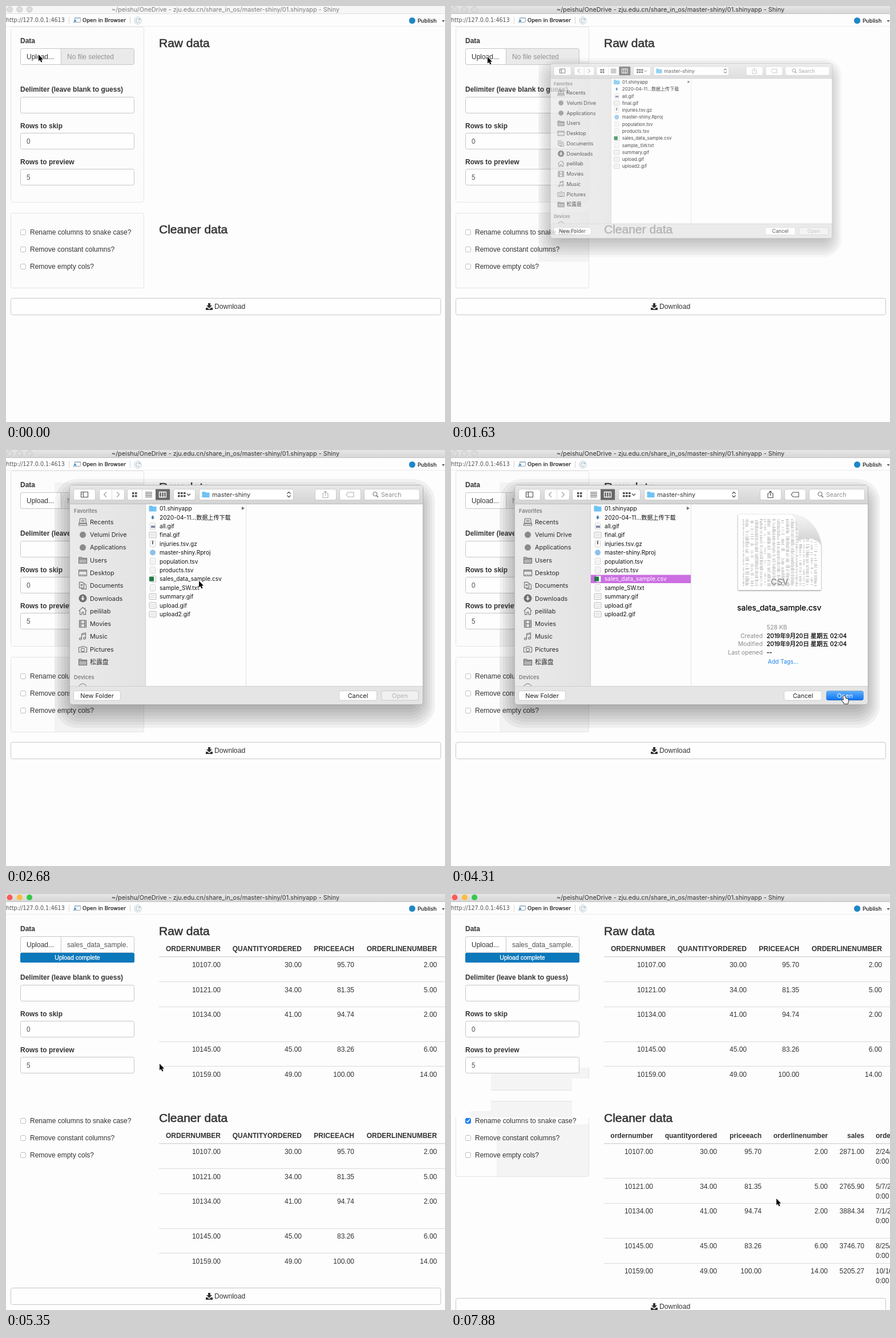
An HTML page with a canvas that plays this animation: 769 px wide and 728 px high, repeating every 8000 ms.

```html
<!DOCTYPE html>
<html lang="en">
<head>
<meta charset="utf-8">
<title>Upload and clean data</title>
<style>
html, body { margin: 0; width: 100%; height: 100%; overflow: hidden; background: #fdfdfd; }
canvas { display: block; }
</style>
</head>
<body>
<canvas id="stage" width="769" height="728"></canvas>
<script>
const W = 769, H = 728, LOOP = 8000;
const stage = document.getElementById('stage').getContext('2d');
const layerCanvas = Object.assign(document.createElement('canvas'), { width: W, height: H });
const layer = layerCanvas.getContext('2d');
let c = stage;

const BODY = '"Liberation Sans", Arial, sans-serif';
const MAC = 'Inter, "Noto Sans CJK SC", "Noto Sans CJK", sans-serif';
const FACES = {
  body: ['', BODY], bold: ['bold ', BODY],
  mac: ['', MAC], semi: ['600 ', MAC],
  bar: ['', '"DejaVu Sans", sans-serif']
};

// ---------- helpers ----------
// y is the middle of the capitals
function text(s, x, y, face = 'body', size = 12, color = '#333', align = 'left', weight = 0) {
  const [style, family] = FACES[face];
  c.font = `${style}${size}px ${family}`;
  c.textAlign = align;
  c.fillStyle = c.strokeStyle = color;
  c.fillText(s, x, y + size * 0.36);
  if (weight) {
    c.lineWidth = weight;
    c.strokeText(s, x, y + size * 0.36);
  }
}
function rect(x, y, x2, y2, fill) {
  c.fillStyle = fill;
  c.fillRect(x, y, x2 - x, y2 - y);
}
function box(x, y, x2, y2, fill, stroke, r = 3) {
  c.beginPath();
  c.roundRect(x + 0.5, y + 0.5, x2 - x - 1, y2 - y - 1, r);
  if (fill) { c.fillStyle = fill; c.fill(); }
  if (stroke) { c.strokeStyle = stroke; c.lineWidth = 1; c.stroke(); }
}
function disc(x, y, r, fill, stroke) {
  c.beginPath();
  c.arc(x, y, r, 0, 7);
  if (fill) { c.fillStyle = fill; c.fill(); }
  if (stroke) { c.strokeStyle = stroke; c.lineWidth = 1; c.stroke(); }
}
function shape(d, x, y, fill, stroke, width = 1.1) {
  const p = new Path2D(d);
  c.save();
  c.translate(x, y);
  c.lineJoin = 'round';
  if (stroke) { c.strokeStyle = stroke; c.lineWidth = width; c.stroke(p); }
  if (fill) { c.fillStyle = fill; c.fill(p, 'evenodd'); }
  c.restore();
}
function clipped(x, y, x2, y2, draw) {
  c.save();
  c.beginPath();
  c.rect(x, y, x2 - x, y2 - y);
  c.clip();
  draw();
  c.restore();
}
function grad(from, to, a, b, across = false) {
  const g = across ? c.createLinearGradient(from, 0, to, 0) : c.createLinearGradient(0, from, 0, to);
  g.addColorStop(0, a);
  g.addColorStop(1, b);
  return g;
}
function bezier(u, p, q) {
  return 3 * (1 - u) * (1 - u) * u * p + 3 * (1 - u) * u * u * q + u * u * u;
}
function ease(x) {
  if (x >= 1) return 1;
  let lo = 0, hi = 1;
  for (let i = 0; i < 20; i++) {
    const m = (lo + hi) / 2;
    if (bezier(m, 0.25, 0.25) < x) lo = m; else hi = m;
  }
  return bezier(lo, 0.1, 1);
}
const last = (rows, t) => rows.filter(r => r[0] <= t).pop();

// ---------- timeline ----------
const ACTIVE = 1330, SELECT = 3130, PRESS = 4310, LOADED = 4460, RENAMED = 6990;
const POPUP = [[1480, 0.7, 0.35], [1630, 0.797, 0.74], [1780, 0.91, 0.93], [1930, 1, 1]];
const MID_X = 421, MID_Y = 253.7;
const POINTER = [
  [0, 57, 85], [150, 72, 94], [300, 98, 110], [450, 113, 117], [600, 104, 111],
  [750, 84, 99], [890, 69, 91], [1040, 64, 89],
  [1930, 84, 101], [2080, 170, 150], [2230, 283, 219],
  [2380, 318, 245], [2530, 341, 267], [2680, 338, 229],
  [3280, 450, 320], [3430, 610, 440], [3570, 690, 470], [3710, 688, 430],
  [4750, 672, 418], [4900, 648, 375], [5050, 545, 345], [5200, 390, 318], [5350, 269, 297],
  [5650, 268, 299], [5800, 225, 307], [5950, 140, 335], [6090, 74, 375], [6240, 40, 388],
  [6390, 30, 397], [7440, 235, 440], [7590, 419, 495], [7880, 570, 533]
];
const popupAt = t => t < LOADED ? last(POPUP, t) : undefined;

// ---------- window ----------
function drawWindow(t) {
  const active = t >= ACTIVE, loaded = t >= LOADED;
  rect(0, 0, W, H, '#fdfdfd');
  rect(0, 0, W, 13, active ? grad(0, 13, '#e6e6e6', '#d6d6d6') : '#f6f6f6');
  rect(0, 13, W, 14, active ? '#c4c4c4' : '#dedede');
  ['#fc5b57', '#fdbc40', '#34c84a'].forEach((col, i) =>
    disc(6.5 + i * 17.3, 6, 5, loaded ? col : '#dcdcdc', loaded ? null : '#c8c8c8'));
  text('~/peishu/OneDrive - zju.edu.cn/share_in_os/master-shiny/01.shinyapp - Shiny',
    384.5, 6.5, 'mac', 10.85, active ? '#333' : '#7c7c7c', 'center');

  text('http://127.0.0.1:4613', 0, 25, 'bar', 9.6, '#555');
  rect(110, 19, 111, 31, '#d4d4d4');
  rect(217, 19, 218, 31, '#d4d4d4');
  box(120, 20, 131, 29, '#f4f8fb', '#9aa9b4', 1);
  rect(120, 20, 131, 22, '#a9bccb');
  shape('M0 4L4 0M1 0H4V3', 118, 25, null, '#4c8fc4', 1.4);
  text('Open in Browser', 134, 25, 'bar', 9.2, '#222', 'left', 0.25);
  disc(231, 25.5, 6.3, '#f7fafb', '#c6ced4');
  shape('M3-2A3.5 3.5 0 1 0 3 2M3.5-4V-1H.5', 231, 25.5, null, '#a9bccb', 1.2);
  disc(711.5, 25.5, 5.5, '#1d86c8');
  text('Publish', 721, 25.5, 'bar', 9.4, '#222', 'left', 0.25);
  shape('M0 0H5L2.5 3Z', 763.5, 25, '#444');
  rect(0, 35, W, 36, '#ebebeb');
}

// ---------- page ----------
function input(y, value) {
  box(25, y, 225, y + 29, '#fefefe', '#c6c6c6');
  text(value, 36, y + 14.5, 'body', 12, '#555');
}
function check(y, label, on) {
  box(25, y - 5, 35, y + 5, on ? '#1a82fb' : '#fff', on ? '#1a78ee' : '#bdbdbd', 2);
  if (on) shape('M-2.5 0L-.6 2.2L2.8-2.8', 30, y, null, '#fff', 1.5);
  text(label, 42, y);
}
function drawPanels(fill) {
  box(8, 36, 242, 344, fill, '#e4e4e4');
  box(8, 362, 242, 494, fill, '#e4e4e4');
}
function drawResidue(t) {
  const grey = '#f4f4f4', edge = '#e3e3e3';
  if (t >= 5800) {
    rect(212, 304, 241, 323, grey);
    rect(241, 304, 242, 323, edge);
  }
  if (t >= 5950) {
    rect(70, 314, 212, 344, grey);
    rect(70, 363, 212, 391, grey);
    rect(70, 343, 212, 344, edge);
    rect(70, 362, 212, 363, edge);
  }
  if (t >= 6240) rect(34, 380, 82, t < RENAMED ? 411 : 391, grey);
  if (t >= RENAMED) {
    clipped(0, 391, 260, 511, () => {
      box(8, 362, 242, 495, '#fdfdfd', edge);
      rect(80, 403, 241, 494, grey);
    });
  }
}
function drawForm(t) {
  const loaded = t >= LOADED, dy = loaded ? 1 : 0, popup = popupAt(t);
  if (loaded) drawResidue(t);
  else drawPanels('#fcfcfc');
  if (popup) {
    // the panels turn darker within reach of the dialog's shadow
    const s = popup[1];
    clipped(MID_X - 336 * s, MID_Y - 197 * s, W, MID_Y + 243 * s, () => drawPanels('#f3f3f3'));
  }

  text('Data', 25, 61, 'bold');
  box(25, 74, 225, 103, loaded ? '#fdfdfd' : '#eaeaea', '#c6c6c6');
  box(25, 74, 97, 103, '#fff', '#c6c6c6');
  text('Upload...', 36, 88.5);
  clipped(97, 75, 214, 102, () =>
    text(loaded ? 'sales_data_sample.csv' : 'No file selected', 107, 88.5, 'body', 12, loaded ? '#555' : '#929292'));
  if (loaded) {
    const w = 200 * ease((t - LOADED + 138) / 600);
    clipped(25, 103, 25 + w, 120, () => {
      box(24.5, 102.5, 25.5 + w, 120.5, '#0b78bb', null, 2);
      const label = w < 80 ? 'Upload' : 'Upload complete';
      text(label, 25 + Math.max(w, 33) / 2, 111.5, 'body', 10.6, '#fff', 'center', 0.3);
    });
  }
  text('Delimiter (leave blank to guess)', 25, 146, 'bold');
  input(159, '');
  text('Rows to skip', 25, 209.5, 'bold');
  input(222, '0');
  text('Rows to preview', 25, 272.5, 'bold');
  input(285, '5');
  check(396 + dy, 'Rename columns to snake case?', t >= RENAMED);
  check(426 + dy, 'Remove constant columns?');
  check(456 + dy, 'Remove empty cols?');
}

const NAMES = ['ORDERNUMBER', 'QUANTITYORDERED', 'PRICEEACH', 'ORDERLINENUMBER', 'sales'];
const ROWS = [
  ['10107.00', '30.00', '95.70', '2.00', '2871.00', '2/24/2003'],
  ['10121.00', '34.00', '81.35', '5.00', '2765.90', '5/7/2003'],
  ['10134.00', '41.00', '94.74', '2.00', '3884.34', '7/1/2003'],
  ['10145.00', '45.00', '83.26', '6.00', '3746.70', '8/25/2003'],
  ['10159.00', '49.00', '100.00', '14.00', '5205.27', '10/10/2003']
];
function drawTable(y, snake) {
  const cols = snake ? [354, 466, 544, 660, 724] : [376, 518, 610, 755];
  const tall = snake ? [0, 2] : [2];
  cols.forEach((x, i) => text(snake ? NAMES[i].toLowerCase() : NAMES[i], x, y, 'bold', 12, '#333', 'right'));
  if (snake) text('orderdate', 744, y, 'bold');
  rect(268, y + 13, W, y + 14.5, '#d8d8d8');
  let ry = y + 27.5;
  ROWS.forEach((row, r) => {
    cols.forEach((x, i) => text(row[i], x, ry, 'body', 12, '#333', 'right'));
    if (snake) {
      text(row[5], 744, ry);
      text('0:00', 744, ry + 17);
    }
    ry += tall.includes(r) ? 60.8 : 43.7;
    if (r < 4) rect(268, Math.round(ry - 14), W, Math.round(ry - 13), '#dadada');
  });
}
function drawPage(t) {
  const loaded = t >= LOADED, snake = t >= RENAMED;
  drawForm(t);
  text('Raw data', 268, 64, 'body', 21, '#333', 'left', 0.55);
  text('Cleaner data', 268, loaded ? 391.5 : 390.5, 'body', 21, '#333', 'left', 0.55);
  if (loaded) {
    drawTable(96, false);
    drawTable(423, snake);
  }
  const y = snake ? 707 : loaded ? 689 : 511;
  box(8, y, 762, y + 30, '#fefefe', '#c8c8c8');
  shape('M-2-6H2V-2H5L0 3L-5-2H-2ZM-6 2H-3L0 5L3 2H6V6H-6Z', 356, y + 15, '#333');
  text('Download', 365, y + 15, 'body', 12.2);
}

// ---------- open dialog ----------
const FOLDER = 'M-7-5H-2L-1-3.5H7V5.5H-7ZM-7-2H7';
const PLACES = [
  ['Recents', 'M-5-6H5L6 2H-6ZM-7 3H7V6H-7ZM-3-3H3M-3-1H3'],
  ['Velumi Drive', null],
  ['Applications', null],
  ['Users', FOLDER],
  ['Desktop', 'M-7-5H7V5H-7ZM-7-3H7M-5 3H-3M-1 3H1M3 3H5'],
  ['Documents', 'M-6-6H0L2-4V4H-6ZM2-3H4L6-1V6H-2V4M-4-2H0M-4 0H0'],
  ['Downloads', 'arrow'],
  ['peililab', 'M-7 0L0-6.5L7 0M-5-1V6H-1.5V2H1.5V6H5V-1M4-6V-3'],
  ['Movies', 'M-6-6H6V6H-6ZM-3-6V6M3-6V6M-3 0H3M-6-3H-3M-6 0H-3M-6 3H-3M3-3H6M3 0H6M3 3H6'],
  ['Music', 'M-2 4V-5L5-6.5V3M-2-3L5-4.5M-2 4A2 1.7 0 1 1-2 3.9M5 3A2 1.7 0 1 1 5 2.9'],
  ['Pictures', 'M-7-3.5H-3L-2-5H3L4-3.5H7V5H-7ZM3 1A3 3 0 1 1 3 .9'],
  ['松露盘', FOLDER]
];
const FILES = ['01.shinyapp', '2020-04-11...数据上传下载', 'all.gif', 'final.gif', 'injuries.tsv.gz',
  'master-shiny.Rproj', 'population.tsv', 'products.tsv', 'sales_data_sample.csv', 'sample_SW.txt',
  'summary.gif', 'upload.gif', 'upload2.gif'];

function fileIcon(name, i, y) {
  const x = 257;
  if (i === 0) shape('M-6.5-5H-1L0-3.5H6.5V5H-6.5Z', x, y, '#6fc3f3');
  else if (i === 1) shape('M-1.5-3H1.5V0H3L0 3.5L-3 0H-1.5Z', x, y, '#3b7fb5');
  else if (name.endsWith('.Rproj')) disc(x, y, 5, '#8cc0ec');
  else if (name.endsWith('.csv')) {
    box(x - 3, y - 6, x + 6, y + 6, '#fff', '#bbb', 1);
    rect(x - 6, y - 4, x + 2, y + 4, '#1f7a45');
  } else if (name.endsWith('.gif') && i > 2) {
    box(x - 6.5, y - 5.5, x + 6.5, y + 5.5, '#fafafa', '#b9b9b9', 1);
    rect(x - 4, y - 2, x + 4, y - 1, '#d2d2d2');
    rect(x - 4, y + 1, x + 4, y + 2, '#d2d2d2');
  } else {
    box(x - 5, y - 6, x + 5, y + 6, '#fff', '#d0d0d0', 1);
    if (i === 2) rect(x - 3, y - 1, x + 4, y + 3, '#8088a8');
    if (i === 4) rect(x - 1, y - 5, x + 1, y + 1, '#666');
    if (i > 5) for (let k = -3; k < 4; k += 2) rect(x - 3, y + k, x + 3, y + k + 0.7, '#ddd');
  }
}
function button(x, x2, y, y2, label, fill = '#fff', color = '#222') {
  box(x, y, x2, y2, fill, 'rgba(0,0,0,.14)', 3.5);
  if (label) text(label, (x + x2) / 2, (y + y2) / 2, 'mac', 10.9, color, 'center');
}
function drawToolbar(selected) {
  const dark = '#4d4d4d', act = selected ? dark : '#b0b0b0';
  clipped(112, 62, 730, 94, () => box(111, 61, 731, 110, grad(61, 94, '#e8e8e8', '#d4d4d4'), null, 5));
  rect(111, 94, 731, 95, '#bebebe');
  for (const [x, x2] of [[118, 157], [163, 208], [212, 288], [293, 332], [338, 504], [541, 579], [584, 622], [627, 725]])
    button(x, x2, 68, 88);
  shape('M-6-4.5H6V4.5H-6ZM-2-4.5V4.5M-4.5-2H-3.5M-4.5 0H-3.5', 137.5, 78, null, dark);
  rect(185, 69, 186, 87, '#ddd');
  shape('M2-4.5L-2.5 0L2 4.5', 174, 78, null, '#a6a6a6', 1.3);
  shape('M-2-4.5L2.5 0L-2 4.5', 196, 78, null, '#a6a6a6', 1.3);
  rect(262, 68.5, 287, 87.5, '#686868');
  rect(238, 69, 239, 87, '#ddd');
  for (const x of [221, 226]) for (const y of [74, 79]) rect(x, y, x + 3.4, y + 3.4, dark);
  shape('M-6-4H6M-6-1.3H6M-6 1.4H6M-6 4.1H6', 250, 78, null, dark, 1);
  shape('M-6-4.5H6V4.5H-6ZM-2-4.5V4.5M2-4.5V4.5', 274.5, 78, null, '#fff', 1.3);
  for (const x of [301, 306, 311]) for (const y of [74, 79]) rect(x, y, x + 3.6, y + 3.2, dark);
  shape('M-3-1.5L0 1.5L3-1.5', 320, 78, null, dark, 1.2);
  shape('M-6.5-5H-1L0-3.5H6.5V5H-6.5Z', 350, 78, '#6fc3f3');
  text('master-shiny', 361, 78, 'mac', 10.9, '#333');
  shape('M-3-1.5L0-4.5L3-1.5M-3 1.5L0 4.5L3 1.5', 495.5, 78, null, dark, 1.3);
  shape('M-2-2H-4.5V5.5H4.5V-2H2M0 2V-6M-2.5-3.5L0-6L2.5-3.5', 559.5, 78, null, act);
  shape('M-6.5 0L-3.5-4H6.5V4H-3.5ZM-2.5 0H-2', 602.5, 78, null, act);
  disc(646.5, 77, 3.6, null, '#666');
  shape('M0 0L3 3', 649, 79.7, null, '#666', 1.4);
  text('Search', 657, 78, 'mac', 10.7, '#8c8c8c');
}
function drawPreview() {
  const page = new Path2D('M503 113H597Q638 119 648 165V245H503Z');
  c.save();
  c.shadowColor = 'rgba(0,0,0,.45)';
  c.shadowBlur = 3;
  c.shadowOffsetY = 1;
  c.fillStyle = '#fff';
  c.fill(page);
  c.restore();
  c.save();
  c.clip(page);
  let seed = 7;
  const rnd = () => (seed = (seed * 16807) % 2147483647) / 2147483647;
  // tiny table: each column has its own width and fill
  for (let x = 511; x < 640;) {
    const w = 3 + rnd() * 5, full = 0.6 + rnd() * 0.4;
    for (let y = 121; y < 239; y += 2)
      if (rnd() < full) rect(x, y, x + w * (0.6 + rnd() * 0.4), y + 1, `rgba(60,60,60,${0.15 + rnd() * 0.3})`);
    x += w + 1.5;
  }
  c.restore();
  shape('M597 113C609 125 612 142 606 160C622 151 640 153 648 166C645 139 627 117 597 113Z', 0, 0,
    grad(113, 166, '#f6f6f6', '#cfcfcf'), '#dcdcdc', 0.7);
  text('CSV', 575.5, 230.5, 'mac', 15, '#888', 'center', 0.3);
  text('sales_data_sample.csv', 575, 276, 'mac', 13.7, '#000', 'center', 0.2);
  const date = '2019年9月20日 星期五 02:04';
  [['', '528 KB'], ['Created', date], ['Modified', date], ['Last opened', '--']].forEach(([k, v], i) => {
    const y = 310.5 + i * 14.6;
    text(k, 546, y, 'mac', 10.4, '#8a8a8a', 'right');
    text(v, 553, y, 'mac', 10.4, i ? '#000' : '#8a8a8a', 'left', i ? 0.25 : 0);
  });
  text('Add Tags...', 555, 370, 'mac', 10, '#1a82e8');
}
function drawShadow() {
  const bands = 8;
  for (let k = 0; k < bands; k++) {
    const s = 26 - 38 * k / (bands - 1);
    box(111 - s, 76 - s, 731 + s * 0.8, 461 + s, 'rgba(0,0,0,.048)', null, 24 + s * 0.6);
  }
}
function drawDialog(selected) {
  drawShadow();
  box(111, 61, 731, 446, '#e5e5e5', '#b4b4b4', 5);
  rect(112, 94, 245, 413, grad(112, 245, '#eaeaea', '#e3e3e3', true));
  rect(245, 94, 730, 413, '#fdfdfd');
  rect(244, 94, 245, 413, '#d2d2d2');
  rect(420, 94, 421, 413, '#e0e0e0');
  drawToolbar(selected);

  text('Favorites', 119, 107, 'semi', 9.2, '#7d7d7d');
  PLACES.forEach(([name, d], i) => {
    const y = 126 + i * 22.27, col = '#707070';
    if (!d) disc(134.5, y, 5.5, '#8a8a8a');
    else if (d === 'arrow') {
      disc(134.5, y, 7, col);
      shape('M-1.2-4H1.2V0H3.6L0 4L-3.6 0H-1.2Z', 134.5, y, '#e9e9e9');
    } else shape(d, 134.5, y, d === FOLDER ? 'rgba(112,112,112,.45)' : null, col);
    text(name, 147, y, 'mac', 10.9, '#2b2b2b');
  });
  text('Devices', 119, 398, 'semi', 9.2, '#7d7d7d');
  clipped(112, 400, 244, 413, () => disc(134.5, 416, 7, null, '#707070'));

  FILES.forEach((name, i) => {
    const y = 102.5 + i * 15.4, on = selected && i === 8;
    if (on) rect(245, 218.5, 420, 233, '#cb6fe2');
    fileIcon(name, i, y);
    text(name, 269, y, 'mac', 10.1, on ? '#fff' : '#111');
  });
  shape('M0-3L5 0L0 3Z', 413, 102, '#707070');
  if (selected) drawPreview();

  rect(112, 413, 730, 414, '#cfcfcf');
  button(118, 201, 421, 438.5, 'New Folder');
  button(583, 650, 421, 438.5, 'Cancel');
  if (selected) button(657, 723, 421, 438.5, 'Open', grad(421, 438, '#62b3fb', '#0b72f6'), '#fff');
  else button(657, 723, 421, 438.5, 'Open', '#f0f0f0', '#b4b4b4');
}
function drawPopup(t) {
  const step = popupAt(t);
  if (!step) return;
  const [, scale, alpha] = step;
  c = layer;
  c.clearRect(0, 0, W, H);
  c.save();
  c.translate(MID_X, MID_Y);
  c.scale(scale, scale);
  c.translate(-MID_X, -MID_Y);
  drawDialog(t >= SELECT);
  c.restore();
  c = stage;
  c.globalAlpha = alpha;
  c.drawImage(layerCanvas, 0, 0);
  c.globalAlpha = 1;
}

// ---------- pointer ----------
function drawPointer(t) {
  const [, x, y] = last(POINTER, t);
  if (t >= PRESS && t < 4750) {
    shape('M0 0C1.6-.8 2.4 0 2.6 1.4L3.2 4.2L6.5 5C8.2 5.6 8.6 7 8 9L7 13.5H1.4C0 11-3 8.8-3.2 7.2C-2.6 6 -1 6.6 .2 8L-1 2C-1.2 1 -.8 .3 0 0ZM3 10V12M5 10V12',
      x, y + 0.5, '#fff', '#111', 1.7);
    return;
  }
  shape('M0 0V11.5L2.6 9.2L4.4 13.4L6.5 12.5L4.7 8.4H8.2Z', x, y, '#0a0a0a', '#fff', 1.6);
}

const start = performance.now();
function frame() {
  const t = (performance.now() - start) % LOOP;
  drawWindow(t);
  drawPage(t);
  drawPopup(t);
  drawPointer(t);
  requestAnimationFrame(frame);
}
frame();
</script>
</body>
</html>
```
